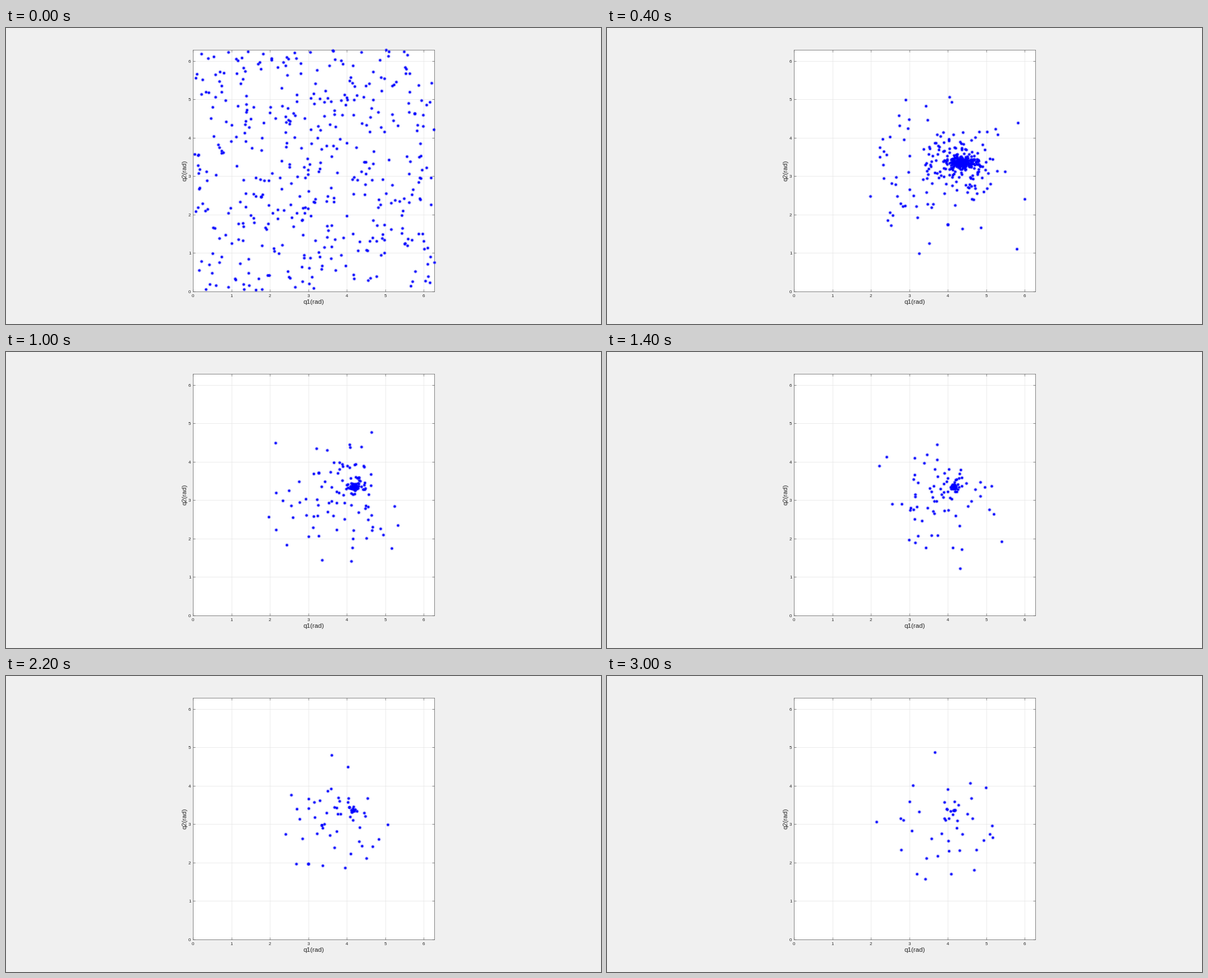
A matplotlib script for the animation above (3.1 s loop, 1060 by 528 pixels).

```python
import numpy as np
import matplotlib.pyplot as plt
from matplotlib.animation import FuncAnimation

WIDTH, HEIGHT, DPI = 1060, 528, 100
PX = 72 / DPI
FRAMES, INTERVAL = 31, 100
LEFT, BASE, UNIT = 333.1, 469.8, 68.5
TURN = 2 * np.pi
INK, LINE = "#262626", "#555555"
GOAL = np.array([4.17, 3.35])


def cloud(rng, count, center, spread, reach=2.3):
    """Normal scatter around a center, without its far tails."""
    z = rng.normal(size=(round(count), 2))
    z = z[np.all(np.abs(z) < reach, axis=1)]
    return center + z * spread


def particles(step):
    rng = np.random.default_rng(70 + step)
    if step == 0:
        return rng.uniform(0.03, TURN, (430, 2))
    drift = np.array([1.36 * np.exp(-step / 2), 0])
    core = cloud(rng, 190 / (1 + (step / 8) ** 3), GOAL + drift,
                 (1.1 * step ** -1.2, 0.19 * step ** -0.62))
    halo = cloud(rng, 540 * step ** -1.25, GOAL + drift * 0.7,
                 (0.82 * step ** -0.5, 0.75 * step ** -0.5), 3)
    loose = cloud(rng, 110 * np.exp(-step / 27), (3.72, 3.07) + drift,
                  0.78 * (1 + 0.8 / step))
    pocket = cloud(rng, 70 * np.exp(-step / 2), (2.75, 2.0), (0.18, 0.4))
    points = np.vstack([core, halo, loose, pocket, GOAL])
    return points[np.all((points > 0) & (points < TURN), axis=1)]


plt.rcParams["font.family"] = "Liberation Sans"
fig = plt.figure(figsize=(WIDTH / DPI, HEIGHT / DPI), dpi=DPI, facecolor="#f0f0f0")
side = TURN * UNIT
ax = fig.add_axes([LEFT / WIDTH, 1 - BASE / HEIGHT, side / WIDTH, side / HEIGHT])
ax.set(xlim=(0, TURN), ylim=(0, TURN), xticks=range(7), yticks=range(7))
ax.set_axisbelow(True)
ax.grid(color="#e4e4e4", linewidth=0.7 * PX)
ax.tick_params(
    direction="in", top=True, right=True, length=4 * PX, width=0.7 * PX,
    color=LINE, labelbottom=False, labelleft=False,
)
for spine in ax.spines.values():
    spine.set(linewidth=0.7 * PX, color=LINE)


def label(x, y, text, size, **style):
    style = {"ha": "center", "va": "baseline", **style}
    fig.text(x / WIDTH, 1 - y / HEIGHT, text, fontsize=size * PX, color=INK, **style)


for value in range(7):
    label(LEFT + value * UNIT, 479.5, str(value), 8)
    label(329.5, BASE - value * UNIT + 2.8, str(value), 8, ha="right")
label(548.5, 492, "q1(rad)", 11.5)
label(318, 254.5, "q2(rad)", 11.5, rotation=90, va="center")

swarm, = ax.plot(
    [], [], linestyle="none", marker=(8, 2, 0), markersize=5.6 * PX,
    markeredgewidth=0.6 * PX, color="#0000ff", clip_on=False, zorder=3,
)


def draw(step):
    swarm.set_data(*particles(step).T)
    return swarm,


animation = FuncAnimation(fig, draw, frames=FRAMES, interval=INTERVAL, repeat=True)
plt.show()
```
